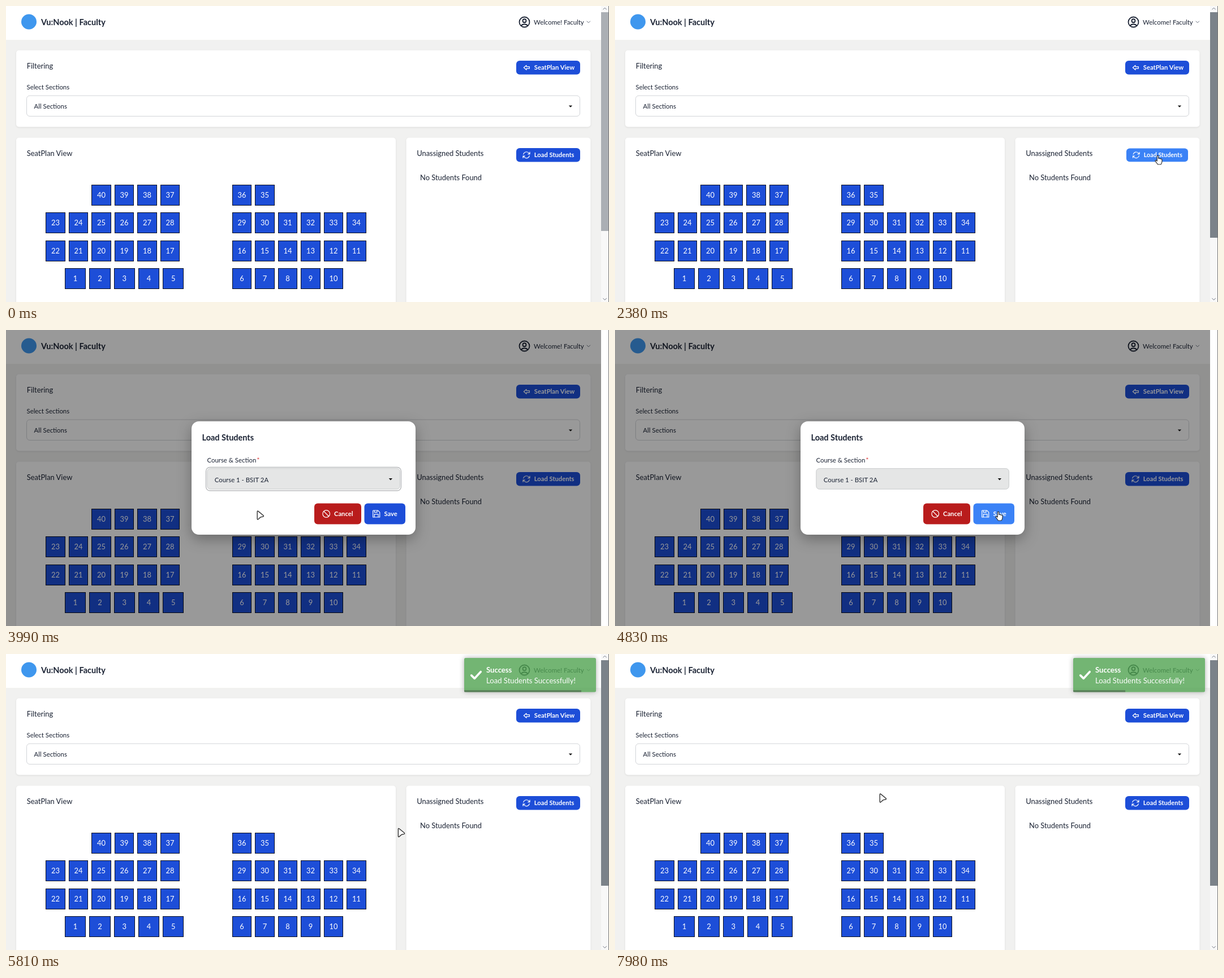
An HTML page for the animation above (8 s loop, 1066 by 525 pixels).

```html
<!DOCTYPE html>
<html lang="en">
<head>
<meta charset="utf-8">
<title>Seat plan</title>
<style>
  html, body { margin: 0; width: 100%; height: 100%; overflow: hidden; background: #f1f1f0; }
  svg { display: block; }
  text { font: 12.9px Lato, sans-serif; fill: #1a2233; white-space: pre; }
  .small { font-size: 11.4px; }
  .title { font-size: 14.5px; font-weight: 700; }
  .label { font-size: 11.2px; font-weight: 700; fill: #fff; }
  .toast { font-size: 13.1px; fill: #fff; }
  .seat { text-anchor: middle; fill: #fff; }
  .icon { fill: none; stroke: #fff; stroke-linecap: round; stroke-linejoin: round; }
  .card { filter: drop-shadow(0 1px 1.5px rgba(0, 0, 0, .09)); }
  #box { filter: drop-shadow(0 8px 12px rgba(0, 0, 0, .3)); }
  #toastBox { filter: drop-shadow(0 0 5px #999); }
</style>
</head>
<body>
<svg id="stage" width="1066" height="525" viewBox="0 0 1066 525"></svg>
<script>
const BLUE = '#1d4ed8', HOVER = '#3b82f6', RED = '#b91c1c', INK = '#1a2233';

const ICONS = {
  user: 'M17.98 18.72A7.5 7.5 0 0 0 12 15.75a7.5 7.5 0 0 0-5.98 2.97M12 3a9 9 0 1 0 0 18a9 9 0 0 0 0-18M15 9.75a3 3 0 1 1-6 0a3 3 0 0 1 6 0Z',
  back: 'M12 6L5 12L12 18V14.5H20V9.5H12Z',
  reload: 'M16 9.35h5M3 19.64v-5h5m-5 0l3.2 3.2a8.25 8.25 0 0 0 13.8-3.7M4 9.86a8.25 8.25 0 0 1 13.8-3.7l3.2 3.2v-5',
  ban: 'M12 2.5a9.5 9.5 0 1 0 0 19a9.5 9.5 0 0 0 0-19M5.3 5.3L18.7 18.7',
  save: 'M4 3H16L21 8V21H3V4ZM7 3V8H14V3M7 21V13H17V21',
  check: 'M3 13L9 19L21 6'
};

const text = (x, y, str, cls = '', extra = '') =>
  `<text x="${x}" y="${y}" class="${cls}" ${extra}>${str.replace('&', '&amp;')}</text>`;
const rect = (x, y, w, h, fill, extra = '') =>
  `<rect x="${x}" y="${y}" width="${w}" height="${h}" fill="${fill}" ${extra}/>`;
const group = (id, ...parts) => `<g id="${id}">${parts.join('')}</g>`;

// icon centred on cx, cy
const icon = (name, cx, cy, size, color = '#fff', width = 1.8) =>
  `<path class="icon" d="${ICONS[name]}" style="stroke:${color};stroke-width:${width}"
    transform="translate(${cx} ${cy}) scale(${size / 24}) translate(-12 -12)"/>`;
const chevron = (x, y, dy) =>
  `<path class="icon" d="M${x} ${y}l2.8 ${dy}l2.8 ${-dy}" style="stroke:#6b7280"/>`;
const card = (x, y, w, h, title) =>
  rect(x, y, w, h, '#fff', 'rx="5" class="card"') + text(x + 18.7, y + 32.5, title);
const select = (x, y, w, fill, stroke, value, baseline, id) =>
  rect(x, y, w, 36.5, fill, `rx="5.5" stroke="${stroke}"`) +
  text(x + 13, y + baseline, value, 'small', `id="${id}"`) +
  `<path d="M${x + w - 19.7} ${y + 17.4}h6.4l-3.2 3.4z" fill="#111"/>`;
const button = (id, x, y, w, h, fill, glyph, label, pad) =>
  group(id, rect(x, y, w, h, fill, 'rx="6"'),
    icon(glyph, x + pad + 7.5, y + h / 2, 16),
    text(x + pad + 21.3, y + h / 2 + 4, label, 'label'));

// odd rows count up, even rows count down
function seatRow(x, row, first, count, size = 34.4) {
  const y = Math.floor(317 + row * 49.5), dir = row % 2 ? 1 : -1;
  return Array.from({ length: count }, (_, i) => {
    const left = x + i * (size + 6.1);
    const a = Math.round(left), b = Math.round(left + size);
    return rect(a + .5, y + .5, b - a - 1, 36, BLUE, 'stroke="#0a0f1e"') +
      text(left + size / 2, y + 23.4, first + dir * i + '', 'seat');
  }).join('');
}

const header = rect(0, 0, 1052, 60, '#fff') +
  '<circle cx="40.5" cy="28" r="13.5" fill="#3f97ee"/>' +
  text(62, 33.5, 'Vu:Nook | Faculty', 'title') +
  icon('user', 916.5, 28.5, 24, INK) +
  text(933, 32.5, 'Welcome! Faculty', 'small') + chevron(1027, 27, 2.8);

const filtering = card(18, 78.5, 1015.5, 136, 'Filtering') +
  button('view', 902, 97, 113, 24.6, BLUE, 'back', 'SeatPlan View', 10.5) +
  text(36.5, 148, 'Select Sections', 'small') +
  select(36.5, 159, 978, '#fff', '#d2d4d8', 'All Sections', 22.5, 'section');

const LEFT = 70.3, RIGHT = 399.8;
const plan = card(18, 233.5, 671, 310, 'SeatPlan View') +
  seatRow(LEFT + 81, 0, 40, 4) + seatRow(RIGHT, 0, 36, 2) +
  seatRow(LEFT, 1, 23, 6) + seatRow(RIGHT, 1, 29, 6) +
  seatRow(LEFT, 2, 22, 6) + seatRow(RIGHT, 2, 16, 6) +
  seatRow(104, 3, 1, 5, 37.2) + seatRow(RIGHT, 3, 6, 5);

const students = card(707.5, 233.5, 326, 310, 'Unassigned Students') +
  button('load', 902, 252, 113, 24.6, BLUE, 'reload', 'Load Students', 10.5) +
  text(732, 309, 'No Students Found');

const scrollbar = rect(1052, 0, 14, 525, '#fff') +
  group('bar', rect(1052, 0, 13, 525, '#f8f8f8'), rect(1052, 11, 13, 388, '', 'id="thumb"'),
    chevron(1055.8, 6, -2.8), chevron(1055.8, 518.6, 2.8)) +
  rect(1065, 0, 1, 525, '#777');

const modal = rect(0, 0, 1052, 525, '#000', 'id="shade"') +
  group('modal', rect(328, 162, 396, 201, '#fff', 'id="box" rx="13"'),
    text(346.5, 196, 'Load Students', 'title'),
    text(355.5, 235, 'Course & Section', 'small'),
    text(443.5, 235, '*', 'small', 'style="fill:#dc2626"'),
    rect(353.5, 243.5, 345, 41.5, 'none', 'id="ring" rx="7" stroke="#b9bbbd" stroke-width="1.4"'),
    select(355.8, 245.7, 340.6, '#e5e6e6', '#c9cbcc', '', 24.5, 'course'),
    button('cancel', 545, 307.5, 83, 37, RED, 'ban', 'Cancel', 13.7),
    button('save', 633.5, 307.5, 72.5, 37, BLUE, 'save', 'Save', 13.7));

const toast = group('toast', rect(810, 7, 233, 60.5, '#51a351', 'id="toastBox" rx="2.5"'),
  icon('check', 831, 37, 22, '#fff', 4),
  text(849, 33, 'Success', 'toast', 'style="font-weight:700"'),
  text(849, 51.5, 'Load Students Successfully!', 'toast'),
  rect(810, 64.3, 233, 3.2, '#000', 'id="progress" opacity=".4"'));

const pointer = '<g id="cursor" stroke="#333" stroke-width="1.4" stroke-linejoin="round" fill="#fff">' +
  '<path id="arrow" d="M1.2 2.2Q1.3.4 2.8 1.4L12 9Q13 10.4 11.4 11L7.2 11.9L2.7 15.8Q1.2 16.4 1.2 14.8Z"/>' +
  '<path id="hand" stroke-width="1.2" d="M4.3 9V2Q5.5.2 6.7 2V6.4Q8 5.4 9 6.8Q10.3 6 11.2 7.4Q13 7 13 9V12Q12.7 15 11 17H5.5Q4 14.5 1.2 11.3Q.8 9.4 2.4 9.5L4.3 11Z"/></g>';

stage.innerHTML = header + filtering + plan + students + scrollbar + modal + toast + pointer;

const el = id => document.getElementById(id);
const set = (id, name, value) => el(id).setAttribute(name, value);
const show = (id, on) => set(id, 'visibility', on ? 'visible' : 'hidden');
const paint = (id, fill) => el(id).firstChild.setAttribute('fill', fill);
const zoom = (id, cx, cy, s) =>
  set(id, 'transform', `translate(${cx} ${cy}) scale(${s}) translate(${-cx} ${-cy})`);

const LOOP = 8000, STEP = 70;
const APPEAR = 980, LOAD = 2450, FOCUS = 3150, PICK = 3570, BLUR = 4760, SAVE = 5040, TOAST = 5320;

// the pointer's stops: time, x, y
const STOPS = [
  [APPEAR, 400, 506], [1820, 957, 279], [2380, 954, 264], [2590, 957, 263],
  [3010, 577, 253], [3430, 408, 262], [3780, 445, 318], [3990, 443, 320],
  [4690, 672, 321], [4970, 672, 321], [5110, 688, 331], [5530, 692, 341],
  [6790, 693, 194], [7980, 467, 247]
];
const clamp = v => Math.min(1, Math.max(0, v));
const ease = p => 1 - (1 - clamp(p)) ** 3;

function pointerAt(t) {
  const i = Math.max(1, STOPS.findIndex(stop => stop[0] >= t));
  const [t0, x0, y0] = STOPS[i - 1], [t1, x1, y1] = STOPS[i];
  const p = clamp((t - t0) / (t1 - t0));
  return [x0 + (x1 - x0) * p, y0 + (y1 - y0) * p];
}

function draw(t) {
  const within = (a, b) => t >= a && t < b;
  const onLoad = within(LOAD - 210, LOAD), onSave = within(SAVE - 420, SAVE);

  set('thumb', 'height', t < 490 ? 388 : 400);
  set('thumb', 'fill', t < APPEAR ? '#abafb4' : '#7b8289');
  show('bar', !within(LOAD, SAVE));

  paint('load', onLoad ? HOVER : BLUE);
  zoom('load', 958.5, 264.3, within(LOAD - 140, LOAD) ? .965 : 1);

  const open = ease((t - LOAD + 50) / 200) - ease((t - SAVE + 60) / 200);
  set('shade', 'opacity', .4 * open);
  set('modal', 'opacity', open);
  zoom('modal', 526, 262.5, .9 + .1 * open);
  show('ring', within(FOCUS, BLUR));
  el('course').textContent = t < PICK ? '--Select Courses & Section--' : 'Course 1 - BSIT 2A';
  paint('save', onSave ? HOVER : BLUE);

  set('toast', 'opacity', .8 * clamp((t - TOAST + STEP) / 300));
  set('progress', 'width', 233 * (1 - clamp((t - TOAST) / 4400)));

  set('cursor', 'transform', `translate(${pointerAt(t)})`);
  show('arrow', t >= APPEAR && !onLoad && !onSave);
  show('hand', onLoad || onSave);
}

const start = performance.now();
function tick() {
  const t = (performance.now() - start) % LOOP;
  draw(Math.floor(t / STEP) * STEP);
  requestAnimationFrame(tick);
}
tick();
</script>
</body>
</html>
```
